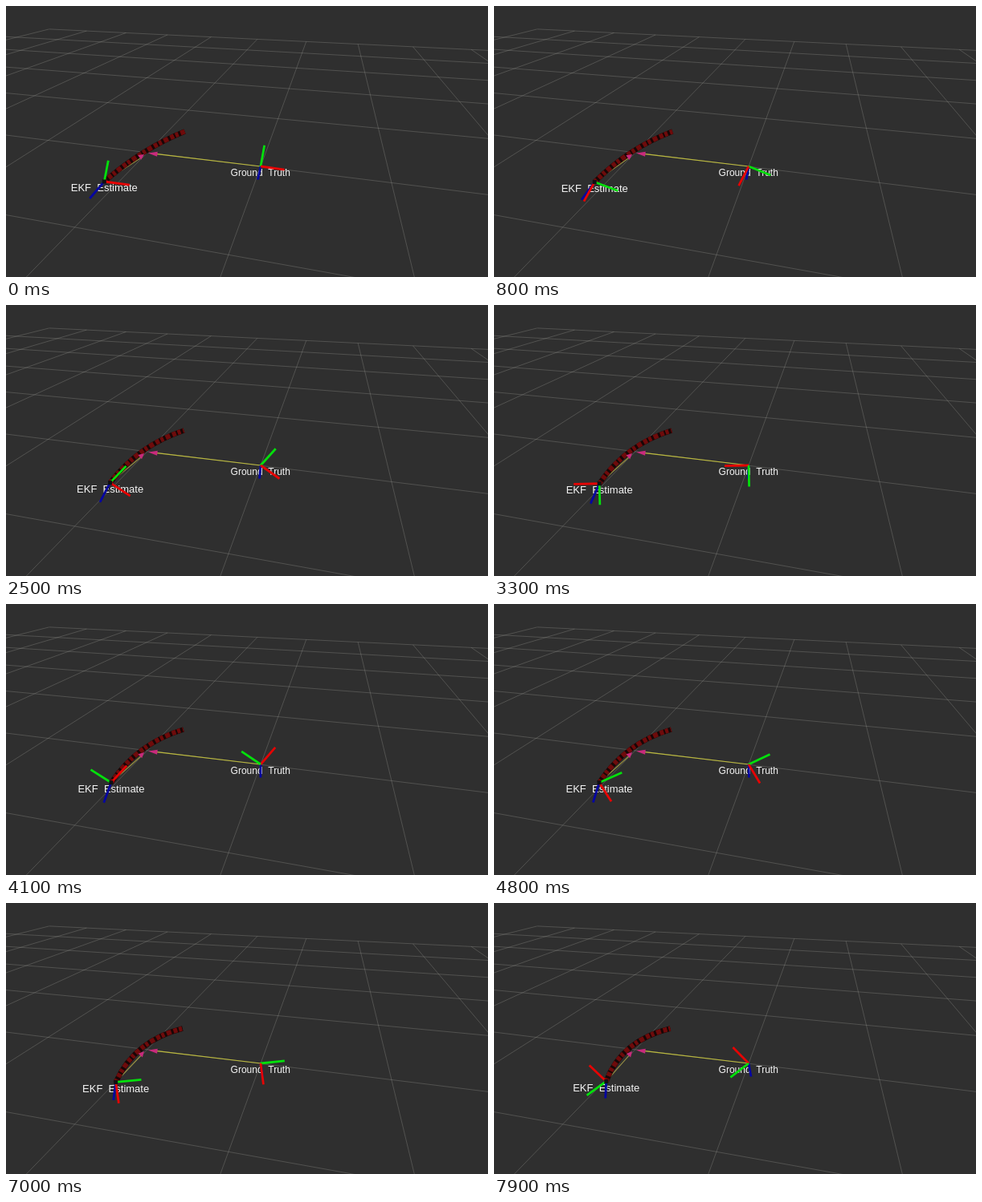
An HTML page with a canvas for the animation above (8000 ms loop, 600 by 338 pixels).

```html
<!DOCTYPE html>
<html lang="en">
<head>
<meta charset="utf-8">
<title>Pose estimate and ground truth</title>
<style>
html, body { margin: 0; width: 100%; height: 100%; overflow: hidden; background: #2f2f2f; }
canvas { display: block; }
</style>
</head>
<body>
<canvas id="stage" width="600" height="338"></canvas>
<script>
const ctx = document.getElementById('stage').getContext('2d');
const LOOP = 8000, STEP = 100;
const HORIZON = -60.8, VANISH_X = 412, VANISH_LEFT = -1790;
const TRUTH = [317, 200], PARENT = [177, 183.5];

// Slow drift, a periodic wobble and a steady spin after a short run-up
function poseAt(t) {
  const s = t / (LOOP - STEP), u = 2 * s - 1;
  const wobble = Math.cos(2 * Math.PI * (t - 1600) / 3150);
  const x = 131 + 3.5 * u + 6 * u ** 3 - 0.8 * wobble;
  const y = 218.5 + 5 * Math.sin(0.65 * Math.PI * s) - 0.5 * wobble;
  return {
    x, y,
    yaw: 28 - 0.17 * t + 6 * wobble - 31 * Math.exp(-t / 500),
    down: [-18 + 17 * s, 21 + 4 * Math.sin(Math.PI * s)],
    truthDown: [-3.5 + 6.5 * s, 16.5],
    mid: [171 - 2 * s, 182.8 - 2.3 * s],
    tip: [222.5 - 3 * s, 156.5]
  };
}

function line(x1, y1, x2, y2, color, width) {
  ctx.strokeStyle = color;
  ctx.lineWidth = width;
  ctx.beginPath();
  ctx.moveTo(x1, y1);
  ctx.lineTo(x2, y2);
  ctx.stroke();
}

function drawGrid() {
  const color = 'rgba(165,165,158,0.37)';
  const rowRun = u => 8.07 + 2.5 * u;
  for (let u = -1; u <= 5; u++) {
    const rowY = x => HORIZON + (x - VANISH_LEFT) / rowRun(u);
    const start = u === 5 ? 54 : 0;
    line(start, rowY(start), 600, rowY(600), color, 0.8);
  }
  for (let v = -6; v <= 3; v++) {
    const run = -0.364 + 0.6055 * v;
    const near = 338 - HORIZON;
    const far = (VANISH_X - VANISH_LEFT) / (rowRun(5) - run);
    line(VANISH_X + run * far, HORIZON + far, VANISH_X + run * near, 338, color, 0.8);
  }
}

function cone(tip, from, length, half) {
  ctx.save();
  ctx.translate(...tip);
  ctx.rotate(Math.atan2(from[1] - tip[1], from[0] - tip[0]));
  ctx.fillStyle = '#c82a7c';
  ctx.beginPath();
  ctx.moveTo(0, 0);
  ctx.lineTo(length, -half);
  ctx.lineTo(length, half);
  ctx.fill();
  ctx.restore();
}

function label(text, x, y, size) {
  ctx.font = size + 'px "Liberation Sans", Arial, sans-serif';
  ctx.textAlign = 'center';
  ctx.fillStyle = '#f4f4f4';
  ctx.fillText(text, x, y);
}

function drawTrail({ x, y, mid, tip }) {
  const path = new Path2D();
  path.moveTo(x, y);
  path.quadraticCurveTo(2 * mid[0] - (x + tip[0]) / 2,
                        2 * mid[1] - (y + tip[1]) / 2, ...tip);
  ctx.strokeStyle = '#180606';
  ctx.lineWidth = 6.5;
  ctx.stroke(path);
  ctx.setLineDash([5, 2, 4, 3, 6, 3]);
  ctx.lineDashOffset = -7;
  ctx.strokeStyle = '#6e0b0b';
  ctx.lineWidth = 6;
  ctx.stroke(path);
  ctx.setLineDash([]);
}

// Horizontal axes trace a foreshortened circle
const spoke = (deg, rx, ry) => {
  const a = deg * Math.PI / 180;
  return [rx * Math.cos(a), -ry * Math.sin(a)];
};

function axes(x, y, yaw, rx, ry, down) {
  const arm = (v, color) => line(x, y, x + v[0], y + v[1], color, 2.8);
  arm(down, '#0606a0');
  const arms = [[spoke(yaw, rx, ry), '#e60404'], [spoke(yaw + 90, rx, ry), '#04e00c']];
  arms.sort((a, b) => a[0][1] - b[0][1]);
  for (const [v, color] of arms) arm(v, color);
}

function draw(t) {
  const p = poseAt(t);
  ctx.fillStyle = '#2f2f2f';
  ctx.fillRect(0, 0, 600, 338);
  drawGrid();

  label('Ground\u00a0 Truth', 316.7, 212, 12);
  label('EKF\u00a0 Estimate', p.x, p.y + 12.5, 13);

  line(...TRUTH, 188, 184.7, '#bab83c', 1.2);
  line(p.x, p.y, 170, 188, '#989040', 1.1);
  drawTrail(p);
  cone(PARENT, TRUTH, 11.5, 3);
  cone([172, 185], [p.x, p.y], 7, 3.5);

  axes(...TRUTH, p.yaw, 30, 26.5, p.truthDown);
  axes(p.x, p.y, p.yaw, 32, 26.5, p.down);
  ctx.fillStyle = '#101014';
  ctx.fillRect(p.x - 2.5, p.y - 2.5, 5, 5);
}

const began = performance.now();
function tick() {
  const t = (performance.now() - began) % LOOP;
  draw(Math.floor(t / STEP) * STEP);
  requestAnimationFrame(tick);
}
tick();
</script>
</body>
</html>
```
